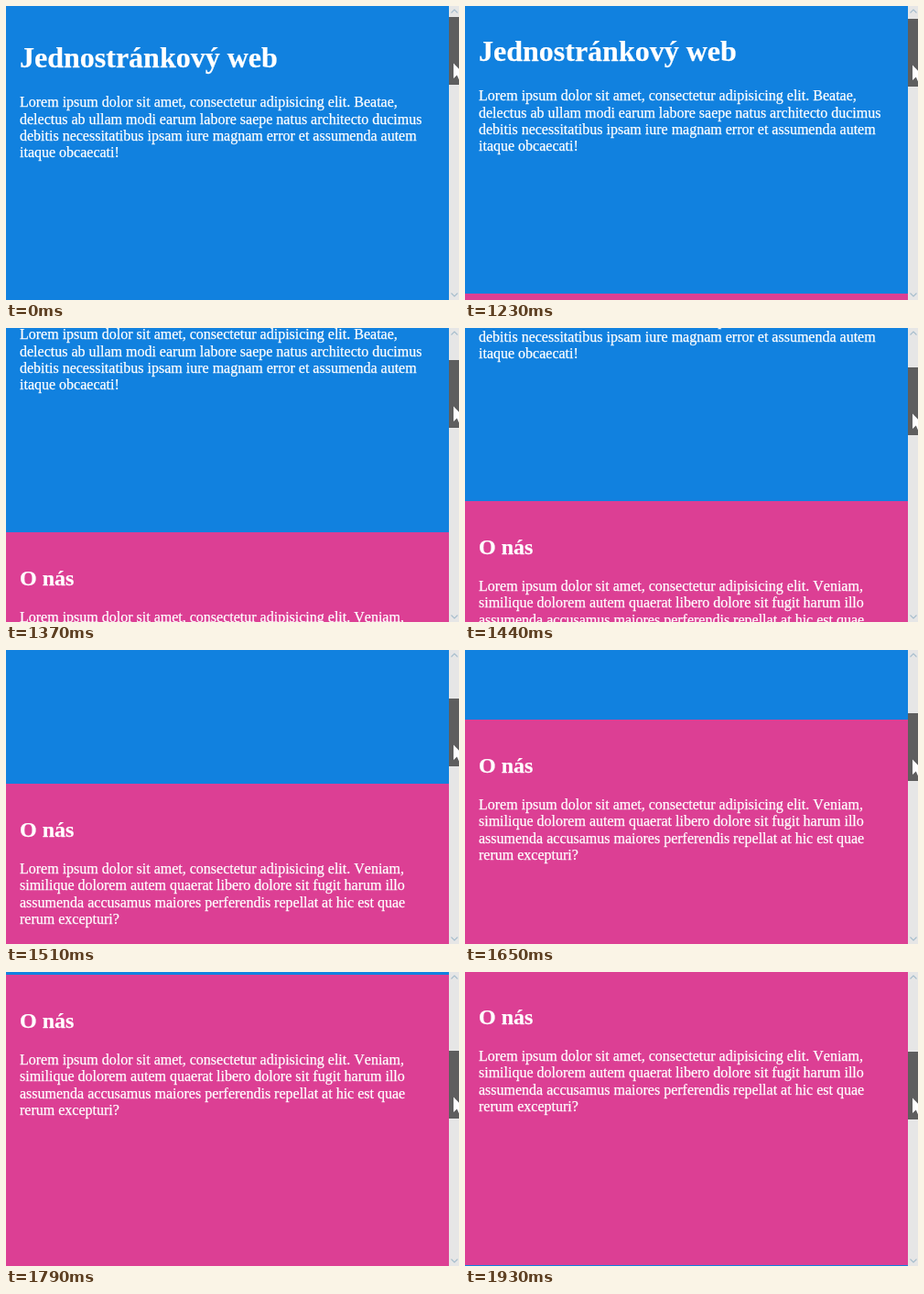
Animation, 495 px wide and 321 px high, one loop 2.43 s. Source, as an HTML page:

```html
<!DOCTYPE html>
<html lang="cs">
<head>
<meta charset="utf-8">
<title>Jednostránkový web</title>
<style>
  html, body { margin: 0; width: 100%; height: 100%; overflow: hidden; }
  svg { display: block; width: 495px; height: 321px; }
  text {
    fill: #fff; stroke: #fff; stroke-width: .25px;
    font: 16px "Liberation Serif", "Times New Roman", serif;
    font-kerning: none; white-space: pre;
  }
  .h1 { font-size: 32px; font-weight: bold; }
  .h2 { font-size: 24px; font-weight: bold; }
  .blue { fill: #1181df; }
  .pink { fill: #dc3f94; }
  .chevron { fill: none; stroke: #a5bccb; stroke-width: 1.1; }
</style>
</head>
<body>
<svg viewBox="0 0 495 321">
  <g id="page">
    <rect class="blue" width="484" height="321"/>
    <text class="h1" x="15" y="67">Jednostránkový web</text>
    <text x="15" y="110">Lorem ipsum dolor sit amet, consectetur adipisicing elit. Beatae,</text>
    <text x="15" y="129">delectus ab ullam modi earum labore saepe natus architecto ducimus</text>
    <text x="15" y="147">debitis necessitatibus ipsam iure magnam error et assumenda autem</text>
    <text x="15" y="165">itaque obcaecati!</text>
    <g transform="translate(0 321)">
      <rect class="pink" width="484" height="321"/>
      <text class="h2" x="15" y="58">O nás</text>
      <text x="15" y="98">Lorem ipsum dolor sit amet, consectetur adipisicing elit. Veniam,</text>
      <text x="15" y="116">similique dolorem autem quaerat libero dolore sit fugit harum illo</text>
      <text x="15" y="135">assumenda accusamus maiores perferendis repellat at hic est quae</text>
      <text x="15" y="153">rerum excepturi?</text>
    </g>
    <rect class="blue" y="642" width="484" height="321"/>
  </g>
  <rect x="484" width="11" height="321" fill="#e6e6e6"/>
  <path class="chevron" d="M486.5 7.5l3.5-3.5 3.5 3.5M486.5 313.5l3.5 3.5 3.5-3.5"/>
  <g id="thumb">
    <rect x="484" width="11" height="74" fill="#5e5e5e"/>
    <path d="M489 50.5v16.5l3.8-3.6 2.5 5.8 2.5-1.1-2.5-5.6h5.2z" fill="#fff"/>
  </g>
</svg>
<script>
  const LOOP = 2430;
  // [start in ms, scroll offset in px]
  const steps = [
    [0, 0], [1230, 7], [1300, 63], [1370, 98], [1440, 132], [1510, 175],
    [1580, 210], [1650, 245], [1720, 279], [1790, 318], [1930, 322]
  ];
  const page = document.getElementById("page");
  const thumb = document.getElementById("thumb");
  const moveY = (node, y) => node.setAttribute("transform", `translate(0 ${y})`);
  const begin = performance.now();

  function draw() {
    const time = (performance.now() - begin) % LOOP;
    const scroll = steps.findLast(([start]) => start <= time)[1];
    moveY(page, -scroll);
    moveY(thumb, Math.round(12 + scroll * 0.233));
    requestAnimationFrame(draw);
  }
  draw();
</script>
</body>
</html>
```
